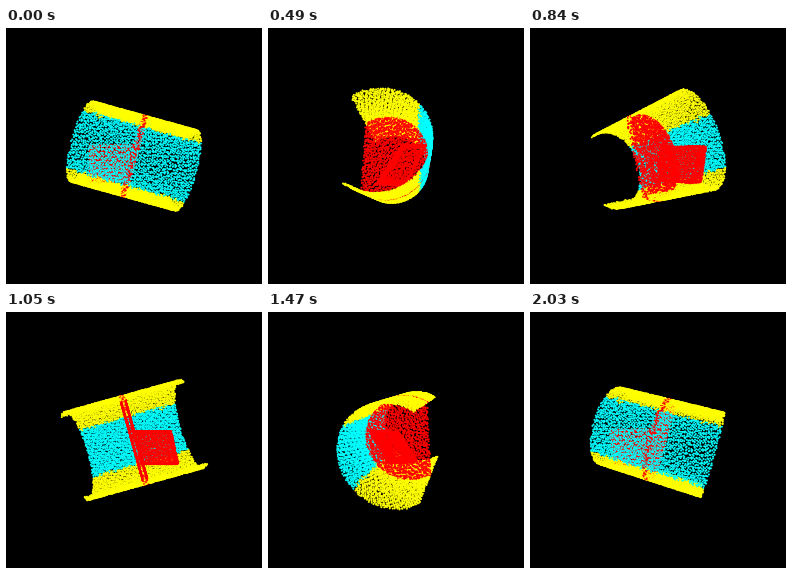
A matplotlib script that plays this animation: 256x256 px, repeating every 2100 ms.

```python
import numpy as np
import matplotlib.pyplot as plt
from matplotlib.animation import FuncAnimation

SIZE, DPI = 256, 100
FRAMES, STEP_MS = 30, 70
DIST = 3.0
FOCAL = SIZE / 2 / np.tan(np.radians(30))
TILT = np.radians(15.5)

HALF_LEN = 0.745      # shell, along its axis
RADIUS = 0.582
SKIN = 0.012
Z_MID = -0.13         # depth of the shell's axis
Z_OPEN = -0.45        # depth of the open side
ARC = np.arccos((Z_OPEN - Z_MID) / RADIUS)
BACK = np.radians(39.5)
SEAT_HALF = 0.03

CYAN, YELLOW, RED = (0, 1, 1), (1, 1, 0), (1, 0, 0)
rng = np.random.default_rng(5)


def spread(n):
    """Evenly scattered points in the unit square, slightly jittered."""
    i = np.arange(n)[:, None]
    grid = rng.random(2) + i * np.array([0.7548776662, 0.5698402910])
    return ((grid + rng.normal(0, 0.17 / np.sqrt(n), (n, 2))) % 1).T


def tilted(s, v, z):
    """Shell coordinates (axis, height, depth) to world coordinates."""
    c, k = np.cos(TILT), np.sin(TILT)
    return np.column_stack([s * c + v * k, v * c - s * k, z])


def curved(n, half):
    """Part of the shell reaching `half` to both sides along the axis."""
    a, b = spread(n)
    phi = (2 * a - 1) * ARC
    r = RADIUS - SKIN * rng.random(n)
    pts = tilted((2 * b - 1) * half, r * np.sin(phi), Z_MID + r * np.cos(phi))
    return pts, phi


def seat(n, radius=0.56):
    a, b = spread(n)
    v = (2 * a - 1) * radius
    z = Z_OPEN + b * (Z_MID + radius - Z_OPEN)
    keep = np.hypot(v, z - Z_MID) < radius
    v, z = v[keep], z[keep]
    return tilted(rng.choice([-SEAT_HALF, SEAT_HALF], v.size), v, z)


def block(density):
    """Prism standing on the seat; corners are (height, depth)."""
    q = np.array([(0.125, 0.39), (0.125, 0.12), (-0.31, -0.16), (-0.33, 0.15)])

    def end(y):
        return -0.54 + 0.1 * y

    parts = []
    for p0, p1 in zip(q, np.roll(q, -1, axis=0)):
        a, b = spread(int(density * 0.5 * np.hypot(*(p1 - p0))))
        yz = p0 + a[:, None] * (p1 - p0)
        x0 = end(yz[:, 0])
        x = x0 + b * (yz[:, 0] * np.tan(TILT) - x0)
        parts.append(np.column_stack([x, yz]))
    a, b = (t[:, None] for t in spread(int(density * 0.14)))
    cap = (1 - b) * ((1 - a) * q[0] + a * q[1]) + b * ((1 - a) * q[3] + a * q[2])
    parts.append(np.column_stack([end(cap[:, 0]), cap]))
    return np.vstack(parts)


shell_pts, phi = curved(6500, HALF_LEN)
is_back = np.abs(phi) < BACK + rng.normal(0, 0.03, phi.size)
shell_cols = np.where(is_back[:, None], CYAN, YELLOW)
rim_pts, _ = curved(320, SEAT_HALF)
red_pts = np.vstack([seat(2000), rim_pts, block(1500)])
points = np.vstack([shell_pts, red_pts])
colors = np.vstack([shell_cols, np.tile(RED, (len(red_pts), 1))])

fig = plt.figure(figsize=(SIZE / DPI, SIZE / DPI), dpi=DPI, facecolor="black")
ax = fig.add_axes([0, 0, 1, 1])
ax.set(xlim=(0, SIZE), ylim=(0, SIZE))
ax.axis("off")
dot = 2 * 1.0 * 72 / DPI
cloud = ax.scatter(points[:, 0], points[:, 1], s=dot ** 2, c=colors, linewidths=0)


def draw(i):
    t = 2 * np.pi * i / FRAMES
    x, y, z = points.T
    depth = DIST + x * np.sin(t) - z * np.cos(t)
    scale = FOCAL / depth
    xy = SIZE / 2 + np.column_stack([(x * np.cos(t) + z * np.sin(t)) * scale, y * scale])
    order = np.argsort(-depth)
    cloud.set_offsets(xy[order])
    cloud.set_facecolors(colors[order])
    return (cloud,)


anim = FuncAnimation(fig, draw, frames=FRAMES, interval=STEP_MS,
                     repeat=True, repeat_delay=0)
plt.show()
```
